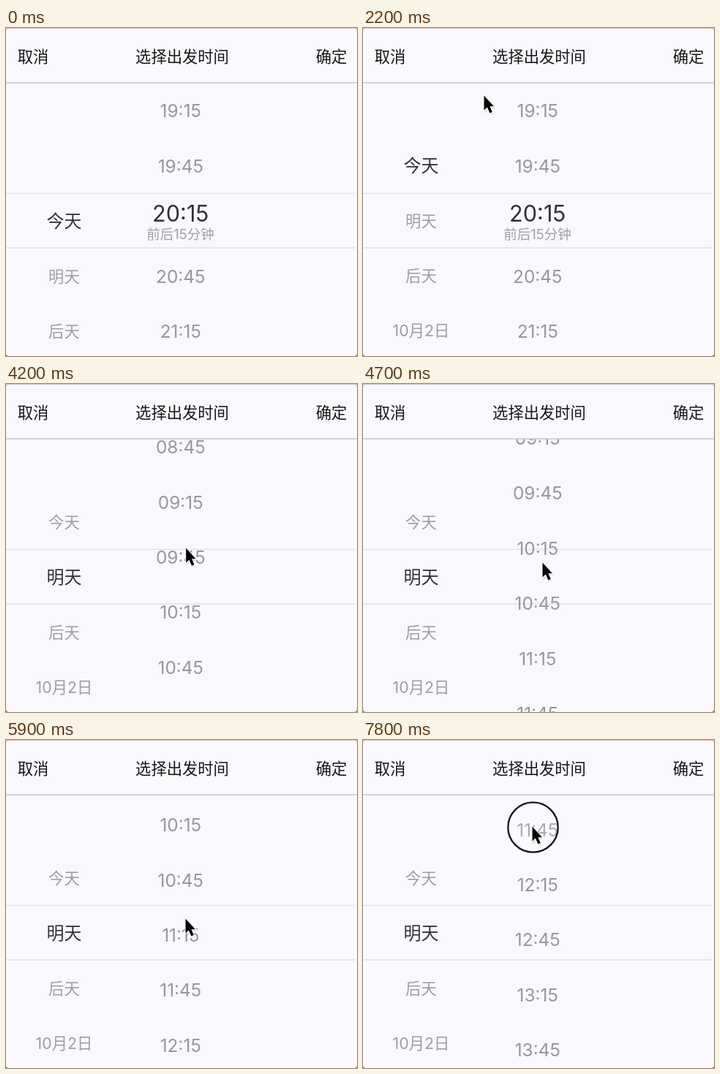
An HTML page for the animation above (8000 ms loop, 480 by 449 pixels).

```html
<!DOCTYPE html>
<html lang="zh-CN">
<head>
<meta charset="utf-8">
<title>选择出发时间</title>
<style>
html, body { margin: 0; width: 100%; height: 100%; overflow: hidden; background: #6f6e71; }
svg { display: block; width: 480px; height: 449px; }
text {
  font-family: Inter, "Noto Sans CJK SC", "Noto Sans CJK", sans-serif;
  text-anchor: middle;
}
.bar text { font-size: 21.3px; fill: #161618; }
.time { font-size: 24.4px; fill: #98979b; }
.day { font-size: 21.3px; fill: #9e9da1; }
.time.on { font-size: 30.6px; fill: #323135; }
.day.on { font-size: 24px; fill: #323135; }
.note { font-size: 18.5px; fill: #a09fa3; }
</style>
</head>
<body>
<svg viewBox="0 0 480 449">
  <defs>
    <clipPath id="wheel"><rect y="75" width="480" height="374"/></clipPath>
  </defs>
  <rect width="480" height="6" fill="#c6c5c8"/>
  <rect y="1" width="480" height="448" rx="4" fill="#faf8fc"/>
  <path d="M0 226.5H478M0 301H478" stroke="#e2e1e5" stroke-width="1.3"/>
  <g clip-path="url(#wheel)">
    <g id="days"></g>
    <g id="times"></g>
  </g>
  <path d="M0 75H480" stroke="#c8c7cb" stroke-width="1.5"/>
  <g class="bar">
    <text x="37" y="47">取消</text>
    <text x="241" y="47">选择出发时间</text>
    <text x="445" y="47">确定</text>
  </g>
  <g id="pointer">
    <circle id="press" cx="1.5" cy="1.5" r="34.2" fill="#faf8fc" fill-opacity=".2" stroke="#141416" stroke-width="2.3"/>
    <path d="M1 4V25L6 20.5L9 27L13 25L10 18H16Z" fill="#000" opacity=".1"/>
    <path d="M.5 .5V20.5L4.8 16.6L8.4 24.6L11.8 23.1L8.4 15.3H14Z" fill="#050505" stroke="#fff" stroke-width="2" paint-order="stroke"/>
  </g>
</svg>
<script>
const LOOP = 8000, STEP = 100, ROW = 75.4, MID = 264.4, SLOP = 23;
const RELOAD = 2300, SETTLED = 6100;
const $ = id => document.getElementById(id);

// Pointer moves: start, end, target x, target y
const ENTRY = [409, 30];
const MOVES = [
  [100, 300, 220, 360], [300, 500, 97, 288], [600, 800, 86, 284],
  [1000, 1700, 90, 177], [1900, 2200, 165, 92], [2200, 2700, 266, 259],
  [2900, 3300, 243, 346], [3500, 3900, 249, 115], [3900, 4350, 245, 244],
  [6300, 6700, 242, 358], [7200, 7800, 231, 118]
];
const PRESSES = [[1000, 2000], [3500, 3900], [7200, LOOP]];

// Decelerating move from a to b
function glide(t, t0, t1, a, b, power = 1.7) {
  const u = Math.min(1, Math.max(0, (t - t0) / (t1 - t0)));
  return b - (b - a) * (1 - u) ** power;
}

const tip = t => MOVES.reduce(([x, y], [t0, t1, x1, y1]) =>
  [glide(t, t0, t1, x, x1), glide(t, t0, t1, y, y1)], ENTRY);

// Rows dragged since the press
const drag = (from, t) => Math.max(0, tip(from)[1] - SLOP - tip(t)[1]) / ROW;

function dayPos(t) {
  if (t < 1000) return 0;
  return glide(t, 1900, RELOAD, drag(1000, Math.min(t, 1900)), 1);
}

function timePos(t) {
  if (t < RELOAD) return 26;
  if (t < 3500) return 0;
  if (t < 7200) {
    const spin = glide(t, 3900, 4200, drag(3500, Math.min(t, 3900)), 5.36, 1.2);
    return glide(t, 4200, SETTLED, spin, 8, 1.9);
  }
  return 8 + drag(7200, t);
}

function addText(parent, cls, x, y, str) {
  const el = document.createElementNS("http://www.w3.org/2000/svg", "text");
  el.setAttribute("class", cls);
  el.setAttribute("x", x);
  el.setAttribute("y", y);
  el.textContent = str;
  parent.append(el);
  return el;
}

const clock = i => {
  const m = 435 + i * 30;
  return [m / 60 | 0, m % 60].map(n => String(n).padStart(2, "0")).join(":");
};
const days = ["今天", "明天", "后天", "10月2日", "10月3日"]
  .map(s => addText($("days"), "day", 79.4, 0, s));
const times = Array.from({ length: 31 }, (_, i) =>
  addText($("times"), "time", 238.8, 0, clock(i)));
const note = addText($("times"), "note", 238.5, 0, "前后15分钟");

function place(id, rows, pos, chosen, y, yOn) {
  $(id).setAttribute("transform", `translate(0 ${MID - pos * ROW})`);
  rows.forEach((el, i) => {
    el.classList.toggle("on", i === chosen);
    el.setAttribute("y", i * ROW + (i === chosen ? yOn : y));
  });
}

function draw(now) {
  const t = Math.floor(now % LOOP / STEP) * STEP;
  const chosen = t < RELOAD ? 26 : t < SETTLED ? 0 : 8;
  place("days", days, dayPos(t), t < RELOAD ? 0 : 1, 8, 9);
  place("times", times, timePos(t), chosen, 8.8, 0.7);
  note.setAttribute("y", chosen * ROW + 24.8);
  $("pointer").setAttribute("transform", `translate(${tip(t)})`);
  $("pointer").style.display = t < 100 ? "none" : "";
  $("press").style.display = PRESSES.some(([a, b]) => t >= a && t < b) ? "" : "none";
}

const start = performance.now();
function tick() {
  draw(performance.now() - start);
  requestAnimationFrame(tick);
}
tick();
</script>
</body>
</html>
```
